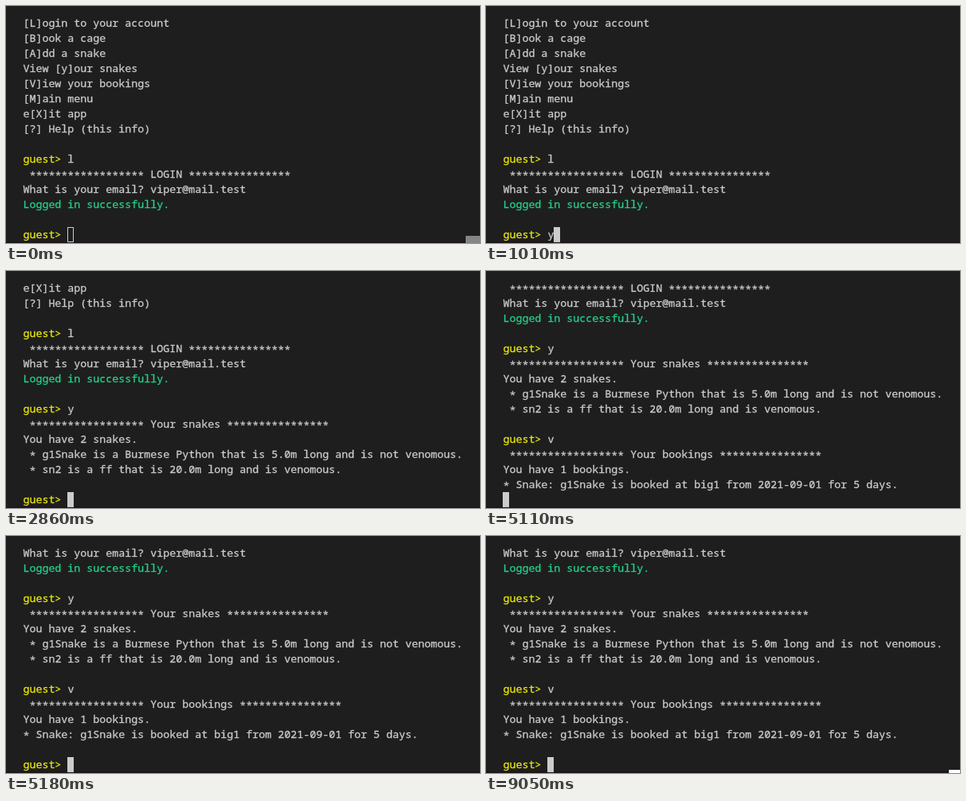
These frames come from a looping animation (595 px wide and 298 px high, 9.25 s). An HTML page:

```html
<!DOCTYPE html>
<html lang="en">
<head>
<meta charset="utf-8">
<style>
  html, body { margin: 0; width: 100%; height: 100%; overflow: hidden; background: #1e1e1e; }
  body { position: relative; }
  div { position: absolute; box-sizing: border-box; }
  #edge { left: 0; top: 296px; width: 595px; height: 2px; background: #1d151a; }
  #view { left: 21px; top: 12px; width: 574px; height: 285px; overflow: hidden; }
  #log {
    position: absolute; left: 0.4px; margin: 0; color: #ccc;
    font: 500 13.3333px/19px "Noto Sans Mono", monospace;
    -webkit-text-stroke: 0.3px;
  }
  #log b { color: #e8e810; font-weight: inherit; }
  #log em { color: #23d18b; font-style: normal; }
  #log s { position: relative; top: 2px; text-decoration: none; }
  #cursor { top: 278px; width: 8px; height: 19px; border: 1px solid #ccc; }
</style>
</head>
<body>
<div id="edge"></div>
<div id="view"><pre id="log"></pre></div>
<div id="cursor"></div>
<div id="corner"></div>
<script>
const LOOP = 9250, ROW = 19, COL = 8, LEFT = 21;
const $ = id => document.getElementById(id);
const heading = title => ` ${'*'.repeat(18)} ${title} ${'*'.repeat(16)}`;
const prompt = input => `<b>guest&gt;</b> ${input}`;

const lines = [
  '[L]ogin to your account',
  '[B]ook a cage',
  '[A]dd a snake',
  'View [y]our snakes',
  '[V]iew your bookings',
  '[M]ain menu',
  'e[X]it app',
  '[?] Help (this info)',
  '',
  prompt('l'),
  heading('LOGIN'),
  'What is your email? viper@mail.test',
  '<em>Logged in successfully.</em>',
  '',
  prompt('<span id="y">y</span>'),
  heading('Your snakes'),
  'You have 2 snakes.',
  ' * g1Snake is a Burmese Python that is 5.0m long and is not venomous.',
  ' * sn2 is a ff that is 20.0m long and is venomous.',
  '',
  prompt('<span id="v">v</span>'),
  heading('Your bookings'),
  'You have 1 bookings.',
  '* Snake: g1Snake is booked at big1 from 2021-09-01 for 5 days.',
  '',
  prompt('')
];
$('log').innerHTML = lines.join('\n').replace(/\*+/g, '<s>$&</s>');

// Each step: start time, first visible row, cursor column
const steps = [[0, 0, 7], [1010, 0, 8], [2860, 6, 7], [3920, 6, 8], [5110, 10, 0], [5180, 11, 7]];
// Corner tab: start time, x, y, colour
const tabs = [
  [0, 577, 289, '#858585'], [70, 577, 289, '#444'], [140, 595, 298, '#444'],
  [8920, 581, 294, '#555'], [8985, 581, 294, '#aaa'], [9050, 581, 294, '#fff']
];
const at = (list, t) => list.filter(item => item[0] <= t).pop();

function draw() {
  const t = performance.now() % LOOP;
  const [, row, col] = at(steps, t);
  const [, x, y, color] = at(tabs, t);
  $('log').style.top = -row * ROW + 'px';
  $('y').style.visibility = t < 1010 ? 'hidden' : 'visible';
  $('v').style.visibility = t < 3920 ? 'hidden' : 'visible';
  $('cursor').style.left = LEFT + col * COL + 'px';
  $('cursor').style.background = t < 600 ? 'none' : '#ccc';
  $('corner').style.cssText =
    `left:${x}px;top:${y}px;width:${595 - x}px;height:${298 - y}px;background:${color}`;
  requestAnimationFrame(draw);
}
draw();
</script>
</body>
</html>
```
